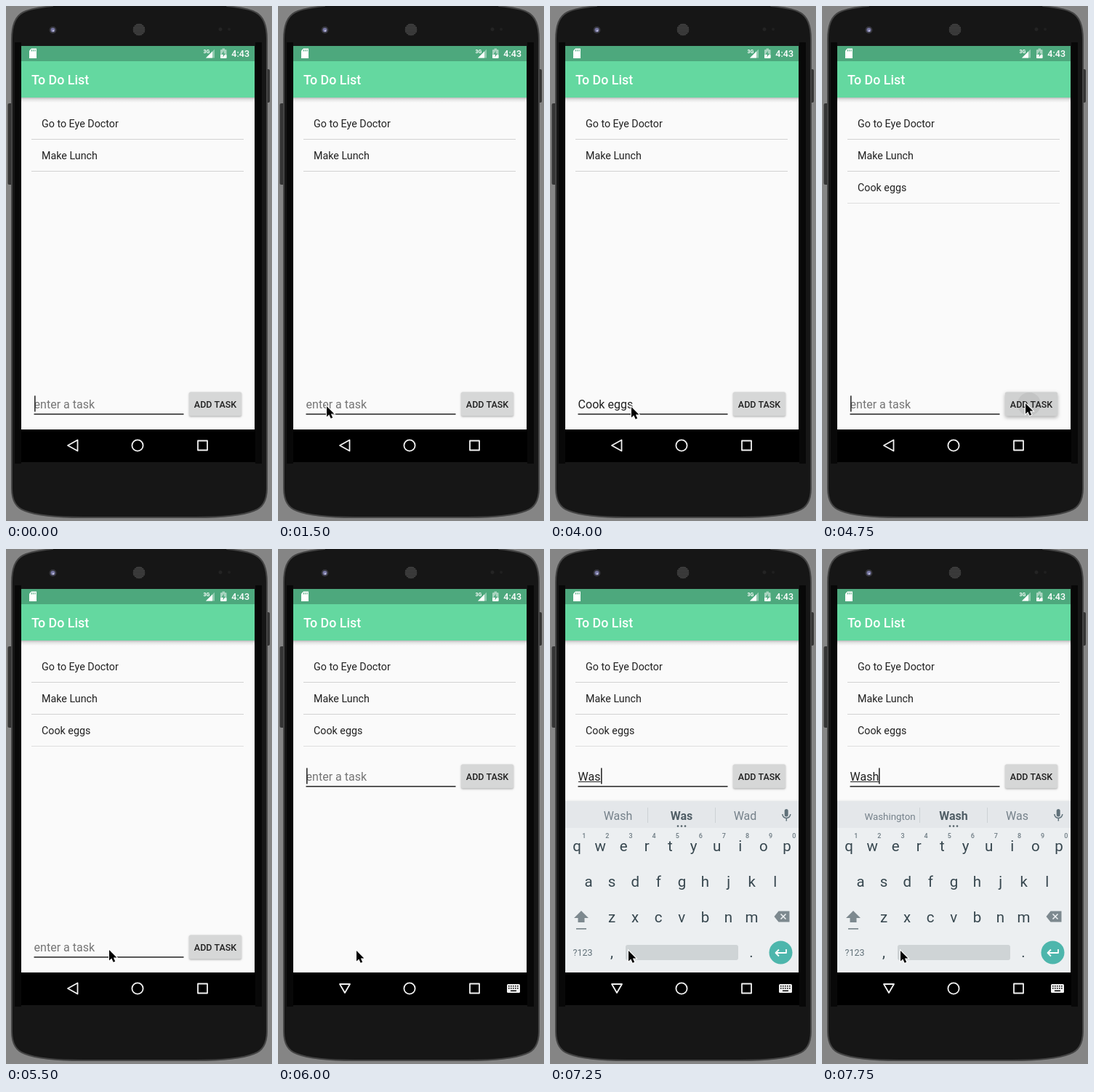
Recreate the animation shown at these times as an HTML page with a canvas. Size 366 by 709 pixels, loop 8 s.

```html
<!DOCTYPE html>
<html lang="en">
<head>
<meta charset="utf-8">
<title>To Do List</title>
<style>
html, body { margin: 0; width: 100%; height: 100%; overflow: hidden; background: #858585; }
canvas { display: block; }
</style>
</head>
<body>
<canvas id="stage" width="366" height="709"></canvas>
<script>
const ctx = document.getElementById('stage').getContext('2d');
const LOOP = 8000, STEP = 250;

// ---------- helpers ----------
function rect(x, y, w, h, fill, r = 0) {
  ctx.fillStyle = fill;
  ctx.beginPath();
  ctx.roundRect(x, y, w, h, r);
  ctx.fill();
}

function dot(x, y, r, fill) {
  ctx.fillStyle = fill;
  ctx.beginPath();
  ctx.arc(x, y, r, 0, Math.PI * 2);
  ctx.fill();
}

function poly(points, fill, stroke, width = 1) {
  ctx.beginPath();
  points.forEach(([x, y], i) => i ? ctx.lineTo(x, y) : ctx.moveTo(x, y));
  ctx.closePath();
  if (fill) { ctx.fillStyle = fill; ctx.fill(); }
  if (stroke) { ctx.strokeStyle = stroke; ctx.lineWidth = width; ctx.stroke(); }
}

function line(path, stroke, width) {
  ctx.strokeStyle = stroke;
  ctx.lineWidth = width;
  ctx.stroke(new Path2D(path));
}

function setFont(size, weight = 400) {
  ctx.font = `${weight} ${size}px Roboto, sans-serif`;
}

function text(str, x, y, size, fill, weight = 400, align = 'left') {
  setFont(size, weight);
  ctx.fillStyle = fill;
  ctx.textAlign = align;
  ctx.fillText(str, x, y);
}

// ---------- timeline ----------
// Latest entry whose start time has passed: [time, value]
function at(track, t) {
  let value = track[0][1];
  for (const [start, v] of track) if (t >= start) value = v;
  return value;
}

const pointer = [
  [0, null], [250, [295, 405]], [500, [196, 472]], [750, [84, 544]], [1000, [67, 551]],
  [4000, [112, 552]], [4250, [262, 549]], [4500, [280, 547]],
  [5250, [252, 548]], [5500, [142, 552]], [5750, [108, 553]]
];
const typed = [
  [0, ''], [1750, 'C'], [2000, 'Co'], [2250, 'Cook'], [2500, 'Cook '], [3000, 'Cook e'],
  [3250, 'Cook eg'], [3500, 'Cook eggs'], [4750, ''],
  [6250, 'W'], [7000, 'Wa'], [7250, 'Was'], [7500, 'Wash']
];
const caretOn = [
  [0, true], [500, false], [1000, true], [1500, false], [1750, true],
  [4000, false], [4500, true], [5250, false], [5750, true]
];
const suggestions = [
  [0, null], [6500, ['We', 'W', 'Was']], [7000, ['Way', 'Wa', 'Was']],
  [7250, ['Wash', 'Was', 'Wad']], [7500, ['Washington', 'Wash', 'Was']]
];

// ---------- phone ----------
function drawPhone() {
  rect(0, 0, 366, 709, '#858585');
  rect(2.5, 134, 7, 112, '#353535', 2);
  rect(357, 87, 6, 46, '#353535', 2);

  const body = new Path2D('M8 46 Q8 17 23 9 Q34 3 64 0 V-4 H304 V0 Q334 3 344 9 Q359 17 359 46 ' +
    'V664 Q359 689 341 695 Q318 704 262 704 H105 Q49 704 26 695 Q8 689 8 664 Z');
  ctx.fillStyle = '#161616';
  ctx.fill(body);
  ctx.strokeStyle = '#444';
  ctx.lineWidth = 2;
  ctx.stroke(body);
  rect(12, 50, 9, 580, '#080808');
  rect(343, 50, 9, 580, '#080808');

  dot(64.5, 33, 5, '#34343a');
  dot(64.5, 33, 3, '#7474a0');
  dot(65, 34, 1.3, '#b9b9d6');
  dot(183, 32.5, 8.5, '#292929');
  for (let y = -7; y <= 7; y += 2)
    for (let x = -7; x <= 7; x += 2)
      if (x * x + y * y < 64) rect(182.5 + x, 32 + y, 1, 1, '#6b6b6b');
  dot(295, 32, 2.5, '#242424');
  dot(307, 32, 2, '#202020');
}

function drawStatusBar() {
  rect(21, 55, 321, 21, '#4da87d');
  poly([[35, 58.5], [42, 58.5], [42, 72], [32, 72], [32, 61.5]], '#fff');
  for (const x of [35, 37.3, 39.6]) rect(x, 60, 1, 2.5, '#4da87d');
  text('3G', 271.5, 65, 7, '#fff', 700);
  poly([[287, 59.5], [287, 71.5], [275, 71.5]], '#92cbb0');
  poly([[284, 62.5], [284, 71.5], [275, 71.5]], '#fff');
  rect(297.5, 58.5, 3.5, 2, '#a9d5c0');
  rect(295, 60, 8.5, 12, '#a9d5c0', 1);
  rect(295, 67, 8.5, 5, '#fff', 1);
  poly([[300, 61.5], [296.5, 66.5], [299, 66.5], [298.5, 70.5], [302, 65.5], [299.5, 65.5]], '#4da87d');
  text('4:43', 335, 70, 12.5, '#fff', 500, 'right');
}

function drawNav(keyboardMode) {
  rect(21, 583, 322, 45, '#000');
  const back = keyboardMode ? [[85, 599], [99, 599], [92, 611]] : [[85, 605], [98.5, 597.5], [98.5, 612.5]];
  ctx.lineJoin = 'round';
  poly(back, null, '#f2f2f2', 1.8);
  ctx.beginPath();
  ctx.arc(181, 605, 7.6, 0, Math.PI * 2);
  ctx.stroke();
  ctx.strokeRect(264, 598.5, 13, 13);
  if (!keyboardMode) return;
  rect(315, 599, 18, 12, '#f2f2f2', 1.5);
  for (let row = 0; row < 2; row++)
    for (let i = 0; i < 5; i++) rect(317 + i * 3, 601 + row * 3, 1.6, 1.6, '#000');
  rect(320, 607.5, 8, 1.5, '#000');
}

// ---------- app ----------
function drawApp(t) {
  rect(21, 126, 321, 457, '#fafafa');
  const shade = ctx.createLinearGradient(0, 126, 0, 133);
  shade.addColorStop(0, '#bdbdbd');
  shade.addColorStop(0.4, '#e4e4e4');
  shade.addColorStop(1, '#fafafa');
  rect(21, 126, 321, 7, shade);
  rect(21, 76, 321, 50, '#64d8a0');
  text('To Do List', 35, 108, 17.84, '#fff', 500);

  const tasks = ['Go to Eye Doctor', 'Make Lunch'];
  if (t >= 4750) tasks.push('Cook eggs');
  tasks.forEach((task, i) => {
    text(task, 49, 167 + i * 44, 14.27, '#212121');
    rect(35, 183 + i * 44, 292, 1, i < 2 ? '#d2d2d2' : '#dedede');
  });
}

function drawField(t) {
  const value = at(typed, t);
  const baseline = t >= 6000 ? 319 : 554;
  text(value || 'enter a task', 38.6, baseline, 16.05, value ? '#212121' : '#757575');
  setFont(16.05);
  const end = 38.6 + ctx.measureText(value).width;
  if (t >= 6500) rect(39, baseline + 1, end - 39, 1, '#212121');
  if (at(caretOn, t)) rect(Math.round(end), baseline - 17.5, 1.6, 22, '#2b2b2b');
  rect(38.5, baseline + 7, 206, 1.7, '#404040');
}

function drawButton(t) {
  const top = t >= 6000 ? 296.5 : 531.5;
  const pressed = t >= 4500 && t < 5000;
  ctx.save();
  ctx.shadowColor = 'rgba(0,0,0,.32)';
  ctx.shadowBlur = pressed ? 5 : 2.5;
  ctx.shadowOffsetY = pressed ? 2 : 1;
  rect(252, top, 72, 33, pressed ? '#d0d1d1' : '#d6d7d7', 2);
  ctx.restore();
  if (pressed) dot(285, top + 16.5, t < 4750 ? 9 : 16, '#c3c4c4');
  text('ADD TASK', 288, top + 21, 12.49, '#212121', 500, 'center');
}

// ---------- keyboard ----------
function drawSuggestions(words) {
  rect(21, 347, 321, 37, '#e4e7ea');
  rect(134, 356, 1, 21, '#cdd2d5');
  rect(227, 356, 1, 21, '#cdd2d5');
  if (words) {
    const [left, middle, right] = words;
    text(left, 93.5, 373, left.length > 6 ? 13.3 : 16, '#75818a', 400, 'center');
    text(middle, 181, 373, 16, '#4f5d65', 700, 'center');
    text(right, 268.5, 373, 16, '#75818a', 400, 'center');
    for (const x of [176, 181, 186]) dot(x, 381.5, 1.3, '#4f5d65');
  }
  rect(322.7, 358, 5, 10.5, '#5f7079', 2.5);
  line('M319.8 365 A5.5 5.5 0 0 0 330.8 365 M325.3 370.5 V374.5', '#5f7079', 1.5);
}

function drawKeyboard(t) {
  rect(21, 345.5, 321, 2, '#f0f1f2');
  rect(21, 384, 321, 199, '#eceff1');
  drawSuggestions(at(suggestions, t));

  const rows = [['qwertyuiop', 37, 416], ['asdfghjkl', 53, 465], ['zxcvbnm', 85, 514]];
  for (const [keys, x, y] of rows)
    [...keys].forEach((key, i) => text(key, x + i * 32.1, y, 20.5, '#37474f', 400, 'center'));
  for (let i = 0; i < 10; i++)
    text((i + 1) % 10, 46.8 + i * 32.1, 398, 9, '#6c7a82', 500, 'center');

  const gray = '#7d898f';
  poly([[43, 498], [53, 508], [47.5, 508], [47.5, 514], [38.5, 514], [38.5, 508], [33, 508]], gray);
  rect(36, 522, 14, 1.7, gray);
  poly([[308.5, 506], [314.5, 498.5], [329.5, 498.5], [329.5, 513.5], [314.5, 513.5]], gray);
  line('M317.5 502.5 l7 7 m0 -7 l-7 7', '#eceff1', 1.6);

  text('?123', 45, 560, 12.5, '#607078', 400, 'center');
  text(',', 85, 562, 20.5, '#37474f', 400, 'center');
  rect(104, 545, 155, 21, '#cfd4d6', 3);
  text('.', 277, 562, 20.5, '#37474f', 400, 'center');
  dot(317.5, 555.5, 16, '#4db6ac');
  line('M325 551 V556 H311 M315 551.5 L310.5 556 L315 560.5', '#fff', 1.8);
}

function drawPointer([x, y]) {
  ctx.save();
  ctx.translate(x, y);
  ctx.lineJoin = 'miter';
  const arrow = [[0, 0], [0, 14.5], [3.3, 11.4], [5.7, 16.8], [8.2, 15.8], [5.9, 10.5], [10.4, 10.5]];
  poly(arrow, null, '#fff', 2);
  poly(arrow, '#000');
  ctx.restore();
}

function draw(t) {
  const fieldRaised = t >= 6000;
  drawPhone();
  drawStatusBar();
  drawApp(t);
  drawField(t);
  drawButton(t);
  if (t >= 6250) drawKeyboard(t);
  drawNav(fieldRaised);
  const tip = at(pointer, t);
  if (tip) drawPointer(tip);
}

const start = performance.now();
function tick(now) {
  const t = Math.max(0, now - start) % LOOP;
  draw(Math.floor(t / STEP) * STEP);
  requestAnimationFrame(tick);
}
draw(0);
requestAnimationFrame(tick);
</script>
</body>
</html>
```
